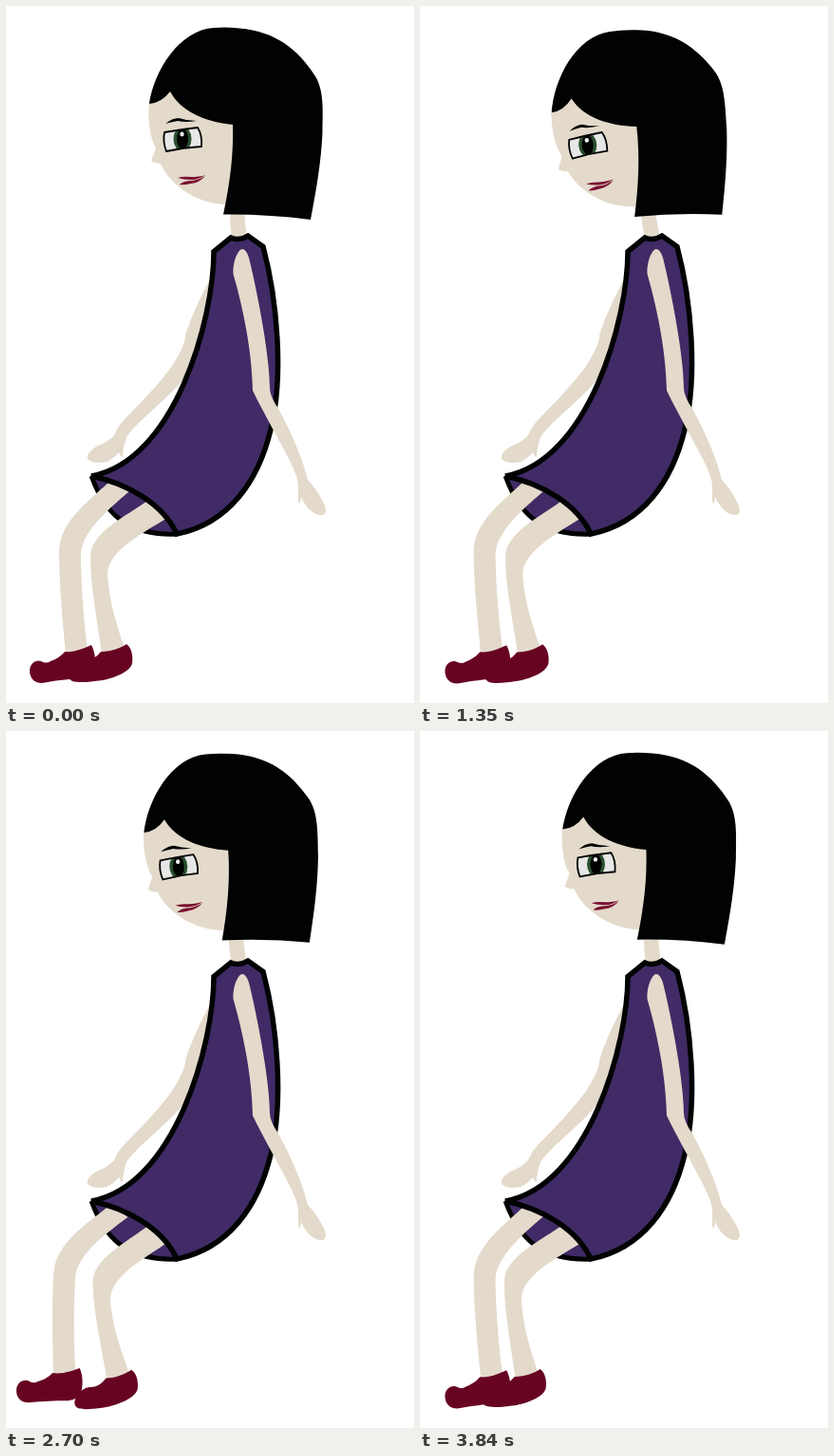
Recreate the animation shown at these times as an HTML page with a canvas. Size 430 by 734 pixels, loop 3.87 s.

```html
<!DOCTYPE html>
<html lang="en">
<head>
<meta charset="utf-8">
<title>Seated woman</title>
<style>
html, body { margin: 0; width: 100%; height: 100%; overflow: hidden; background: #fff; }
canvas { display: block; }
</style>
</head>
<body>
<canvas id="stage" width="430" height="734"></canvas>
<script>
const ctx = document.getElementById('stage').getContext('2d');
const LOOP = 3870, CYCLE = 3780, STEP = 30;
const SKIN = '#e3dacb', DRESS = '#402b66', INK = '#010302', SHOE = '#670422', LIP = '#7a1030';

const path = d => new Path2D(d);

const backArm = path('M216 286 C205 306 194 330 189 347 Q189 357 175 379 C162 397 146 414 132 428 Q118 441 114 452 Q108 459 95 464 Q84 471 86 477 Q92 483 106 480 Q113 477 119 470 Q122 477 123 474 Q123 466 127 454 C136 441 152 428 168 413 Q186 396 194 384 L222 330 Z');
const hemBack = path('M90 495 C98 517 110 535 125 544 C142 554 160 557 180 556 C166 524 130 502 90 495 Z');
const hemEdge = path('M90 495 C98 517 110 535 125 544 C142 554 160 557 180 556');
const dress = path('M219 258.5 C219 330 178 479 90 495 C129 503 166 525 180 556 C235 545 266 500 279 446 C293 390 286 310 271 253.5 L255 242 Q246 248 237 244 Z');
const frontArm = path('M249 256 C243 257 238 274 240 284 C248 312 259 358 260 405 C271 428 287 455 298 477 Q308 496 308 505 L308 522 Q310 527 311 517 C317 530 325 537 334 536 Q340 533 334 522 Q327 508 318 499 C312 474 299 446 287 424 Q278 411 278 402 C278 372 267 310 256 265 Q253 256 249 256 Z');

const backLeg = path('M112 498 C92 518 56 541 56 575 C56 612 60 648 63 684 L86 680 C82 645 79 611 79 577 C80 555 104 533 130 511 Z');
const backShoe = path('M25 700 C25 692 32 688 37 690 Q42 693 47 690 Q56 687 62 680 C72 681 83 676 90 673 C94 680 95 691 93 700 Q90 706 80 708 C65 709 55 710 38 713 C29 713 25 707 25 700 Z');
const frontLeg = path('M152 519 C126 538 89 554 89 580 C89 614 97 651 101 683 L125 677 C117 652 108 626 107 597 C109 573 143 556 170 539 Z');
const frontShoe = path('M66 705 C67 698 73 690 82 689 Q92 690 100 680 C111 680 121 676 127 672 C133 676 134 686 133 692 C131 701 116 707 102 710 C88 712 76 713 70 711 Q66 709 66 705 Z');

const neck = path('M236 212 L251 212 Q252 230 254 246 L238 247 Q236 230 236 212 Z');
const face = path('M151 98 C149 118 151 137 158 150 L153 163 Q157 166 163 166 C171 185 197 208 232 209 L245 160 L240 115 L173 86 Z');
const hair = path('M151 103 C156 68 183 25 219 23 Q232 22 246 23.5 C285 27 308 46 326 74 C335 89 334 108 333.5 134 C332 165 327 194 321 225 Q276 219 229 219.5 C236 187 240 156 239 125 C210 122 184 111 173 90 Q164 102 151 103 Z');
const brow = path('M168 124 Q175 118 182 118 Q191 121 201 121 Q189 123 181 121 Q175 122 168 124 Z');
const eye = path('M167 133 Q184 130 202 128 Q207 136 206 148 Q187 149 169 153 Q165 143 167 133 Z');
const lips = path('M181 181 Q186 179 195 180 Q204 180 210 178 Q203 183 195 183 Q187 183 181 181 Z M183 188 Q187 184 196 184 Q204 183 210 179 Q204 186 195 187 Q187 189 183 188 Z');

// Time and sideways shift of the foot, in pixels
const backSwing = [[0, 0], [360, 8], [900, -13], [1920, 19.5], [2640, -15], [CYCLE, 0]];
const frontSwing = [[0, 0], [420, -2.6], [1140, 3.2], [2340, -1.8], [3090, 13.8], [CYCLE, 0]];
// Time and tilt of the head, in radians
const nod = [[0, 0], [1170, 0.0892], [CYCLE, 0]];

function at(keys, t) {
  let i = 1;
  while (i < keys.length - 1 && t > keys[i][0]) i++;
  const [t0, a] = keys[i - 1], [t1, b] = keys[i];
  return a + (b - a) * (t - t0) / (t1 - t0);
}

function fill(shape, color) {
  ctx.fillStyle = color;
  ctx.fill(shape);
}

function line(shape, width) {
  ctx.strokeStyle = INK;
  ctx.lineWidth = width;
  ctx.stroke(shape);
}

function oval(x, y, rx, ry, color) {
  ctx.beginPath();
  ctx.ellipse(x, y, rx, ry, 0, 0, Math.PI * 2);
  ctx.fillStyle = color;
  ctx.fill();
}

function turned(x, y, angle, paint) {
  ctx.save();
  ctx.translate(x, y);
  ctx.rotate(angle);
  ctx.translate(-x, -y);
  paint();
  ctx.restore();
}

function drawLeg(leg, shoe) {
  fill(leg, SKIN);
  fill(shoe, SHOE);
}

function drawHead() {
  fill(face, SKIN);
  fill(hair, INK);
  fill(brow, INK);
  fill(eye, '#e6e7e6');
  ctx.save();
  ctx.clip(eye);
  oval(186, 140, 9.5, 13, '#2b4f2f');
  oval(186, 140, 6, 10.5, INK);
  oval(185.5, 135, 2.2, 2.4, '#eee');
  ctx.restore();
  line(eye, 1.8);
  fill(lips, LIP);
}

function draw(t) {
  const tilt = -at(nod, t);
  ctx.fillStyle = '#fff';
  ctx.fillRect(0, 0, 430, 734);
  ctx.lineJoin = 'miter';
  ctx.miterLimit = 3;

  fill(backArm, SKIN);
  fill(hemBack, DRESS);
  line(hemEdge, 5);
  turned(115, 487, -at(backSwing, t) / 213, () => drawLeg(backLeg, backShoe));
  turned(150, 505, -at(frontSwing, t) / 185, () => drawLeg(frontLeg, frontShoe));

  turned(257, 255, tilt, () => fill(neck, SKIN));
  fill(dress, DRESS);
  line(dress, 5.5);
  fill(frontArm, SKIN);
  turned(257, 255, tilt, drawHead);
}

const start = performance.now();
function tick() {
  const t = (performance.now() - start) % LOOP;
  draw(Math.floor(t / STEP) * STEP % CYCLE);
  requestAnimationFrame(tick);
}
tick();
</script>
</body>
</html>
```
